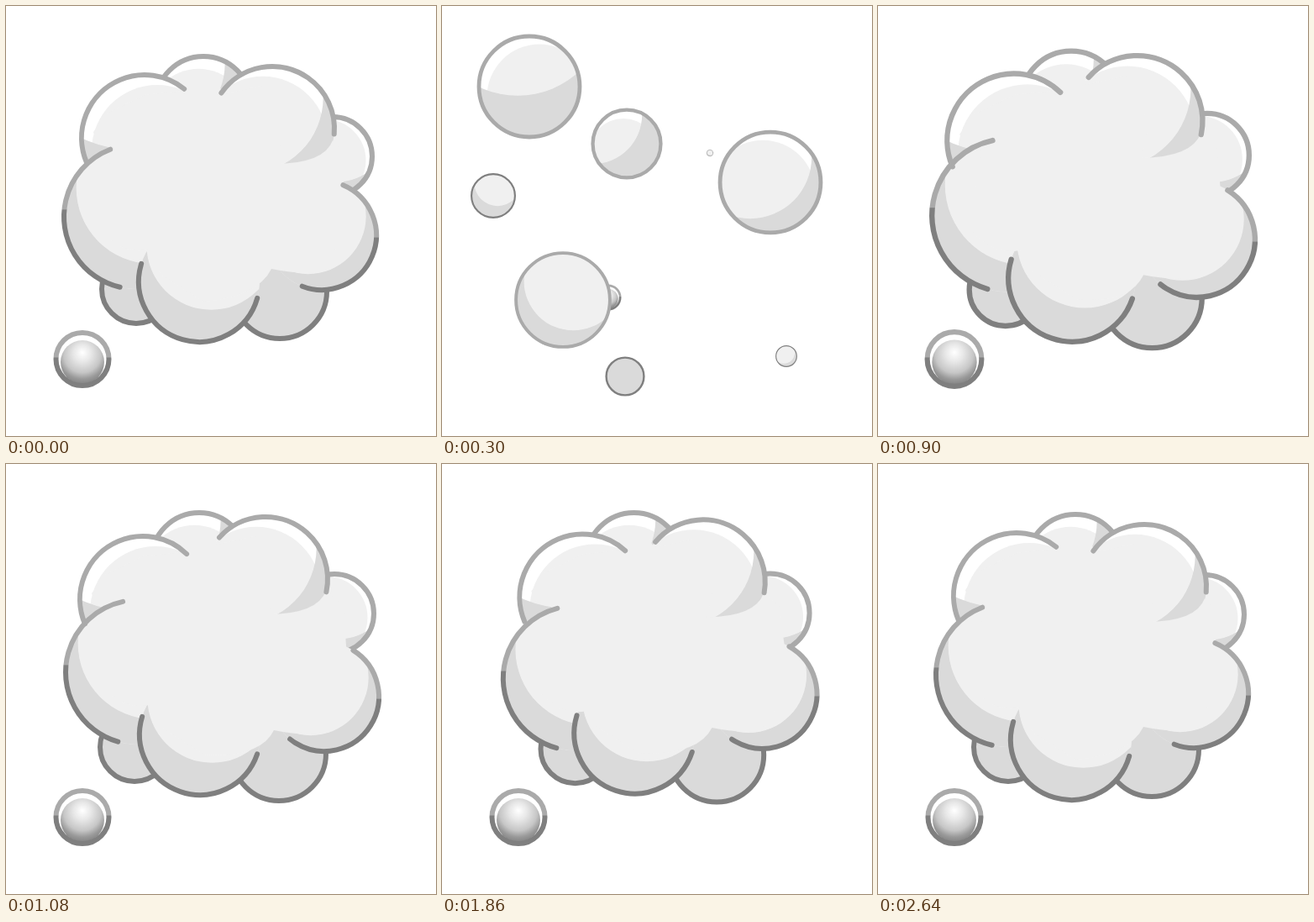
Write an HTML page with a canvas that moves like this. It is 512 px wide and 512 px high and loops after 2700 ms.

```html
<!DOCTYPE html>
<html lang="en">
<head>
<meta charset="utf-8">
<title>Thought bubble</title>
<style>
html, body { margin: 0; width: 100%; height: 100%; overflow: hidden; background: #fff; }
canvas { display: block; width: 512px; height: 512px; }
</style>
</head>
<body>
<canvas id="stage" width="512" height="512"></canvas>
<script>
const ctx = document.getElementById('stage').getContext('2d');
const LOOP = 2700, STEP = 60, BURST = 50, MERGE = 870;
const LIGHT = '#aaaaaa', DARK = '#7f7f7f', FILL = '#f0f0f0', SHADE = '#dadada';
const TAU = Math.PI * 2, rad = d => d * Math.PI / 180;

// Lobes from back to front.
// lit: lit circle in radii; gloss: centre of the area inside the white rim;
// sway: offsets at the wobble keys; arc: start, end and their swing in degrees;
// out: burst x, y, scale, end; grow: offset, start.
const lobes = {
  H: { x: 155, y: 337, r: 41, tone: DARK, sway: [[-2, 0], [2, 2], [4, 2]],
       out: [120, 400, .05, 310], grow: [-56, 40, 655] },
  I: { x: 326, y: 340, r: 56, tone: DARK, sway: [[-1, 5], [0, 7], [2, 5]],
       out: [218, 441, .4, 430], grow: [20, 40, 700] },
  B: { x: 235, y: 117, r: 57, tone: LIGHT, lit: [-1, -.85, 1.45], gloss: [-.1, .3],
       sway: [[-5, -2], [-9, -3], [-3, -1]], out: [220, 164, .71, 560], grow: [0, -15, 720] },
  D: { x: 389, y: 179, r: 47, tone: LIGHT, lit: [.1, -.7, 1.35], gloss: [-.2, .1],
       sway: [[2, -1], [2, -2], [1, -1]], out: [319, 175, .08, 330], grow: [15, -5, 700] },
  A: { x: 165, y: 157, r: 75, tone: LIGHT, lit: [-.23, -1.6, 1.78], gloss: [.2, .2],
       arc: [157, 309, 0, 5], sway: [[-2, 4], [2, 4], [2, -1]],
       out: [104, 96, .8, 600], grow: [-25, -20, 680] },
  C: { x: 317, y: 146, r: 74, tone: LIGHT, lit: [-.4, -.5, 1.22], gloss: [-.15, .2],
       arc: [215, 365, 7, 7], sway: [[-8, -9], [-9, -8], [-3, -3]],
       out: [391, 210, .81, 800], grow: [-16, -5, 656] },
  G: { x: 155, y: 251, r: 86, tone: LIGHT, split: -.1, lit: [.22, -.4, 1.05],
       arc: [103, 249, 3, 9], sway: [[2, -3], [5, 3], [2, 4]],
       out: [144, 350, .65, 560], grow: [-35, 30, 680] },
  E: { x: 376, y: 273, r: 65, tone: DARK, split: .04, lit: [-.25, -.35, 1.06],
       arc: [-67, 111, 9, 18], sway: [[3, 4], [7, -1], [3, 3]],
       out: [410, 417, .19, 370], grow: [15, 15, 690] },
  F: { x: 230, y: 328, r: 72, tone: DARK, lit: [.2, -.6, 1.07],
       arc: [16, 197, 3, 0], sway: [[1, -6], [1, -9], [-2, -5]],
       out: [61, 226, .36, 420], grow: [6, 80, 658] }
};
const ball = { x: 91, y: 420.5, r: 31.5, out: [198, 347, .45, 450] };
const order = Object.values(lobes);

// Bright middle of the cloud; each point follows a lobe (line or quadratic).
const middle = [
  ['A', 104, 150], ['A', 108, 166, 128, 168], ['G', 120, 200], ['G', 115, 270],
  ['G', 140, 296, 168, 290], ['F', 185, 320], ['F', 235, 352], ['E', 300, 346, 316, 313],
  ['E', 345, 319, 375, 317], ['E', 405, 270], ['E', 402, 213],
  ['D', 400, 170], ['C', 389, 160], ['C', 379, 187, 322, 188], ['C', 330, 150],
  ['C', 305, 95], ['C', 259, 105], ['B', 248, 84], ['B', 212, 84], ['A', 212, 101],
  ['A', 165, 106], ['A', 120, 128]
];

const keys = [1080, 1560, 2160, 2640];

// Smooth curve through the wobble keys; the last one is rest.
function sway(v, t) {
  const p = [...v, 0];
  t = Math.min(Math.max(t, keys[0]), keys[3]);
  let i = 0;
  while (i < 2 && t > keys[i + 1]) i++;
  const u = (t - keys[i]) / (keys[i + 1] - keys[i]);
  const a = p[Math.max(i - 1, 0)], b = p[i], c = p[i + 1], d = p[Math.min(i + 2, 3)];
  return b + u * ((c - a) / 2 + u * (a - 2.5 * b + 2 * c - d / 2 + u * (1.5 * (b - c) + (d - a) / 2)));
}

const clamp = u => Math.min(Math.max(u, 0), 1);
const backOut = u => 1 + 2.3 * (u - 1) ** 3 + 1.3 * (u - 1) ** 2;

// Fly out with drag and a little gravity while shrinking.
function burst(o, t) {
  const [x, y, k, end] = o.out;
  const age = t - BURST, ref = 300 - BURST, life = end - BURST;
  if (age < 0 || age >= life) return null;
  const n = age / ref, go = n ** .46, fall = 6.3 * n * (n - 1);
  const s = 1 - (age / life) ** (Math.log(1 - k) / Math.log(ref / life));
  return { x: o.x + (x - o.x) * go, y: o.y + (y - o.y) * go + fall, s };
}

function rest(o, t) {
  return { x: o.x + sway(o.sway.map(p => p[0]), t), y: o.y + sway(o.sway.map(p => p[1]), t), s: 1 };
}

function grow(o, t) {
  const p = rest(o, t), [dx, dy, start] = o.grow;
  const u = clamp((t - start) / 340), away = (1 - u) ** 3;
  return { x: p.x + dx * away, y: p.y + dy * away, s: u > 0 ? backOut(u) : 0 };
}

function disc(x, y, r, fill) {
  ctx.beginPath();
  ctx.arc(x, y, r, 0, TAU);
  ctx.fillStyle = fill;
  ctx.fill();
}

function body(o, p) {
  const r = o.r * p.s;
  if (!o.lit) return disc(p.x, p.y, r, SHADE);
  const [lx, ly, lr] = o.lit;
  ctx.save();
  disc(p.x, p.y, r, o.gloss ? '#fff' : FILL);
  ctx.clip();
  if (o.gloss) disc(p.x + o.gloss[0] * r, p.y + o.gloss[1] * r, 1.04 * r, FILL);
  ctx.beginPath();
  ctx.rect(p.x - 5 * r, p.y - 5 * r, 10 * r, 10 * r);
  ctx.arc(p.x + lx * r, p.y + ly * r, lr * r, 0, TAU);
  ctx.fillStyle = SHADE;
  ctx.fill('evenodd');
  ctx.restore();
}

function twoTone(y) {
  const g = ctx.createLinearGradient(0, y - .5, 0, y + .5);
  g.addColorStop(0, LIGHT);
  g.addColorStop(1, DARK);
  return g;
}

function ring(p, r, width, style, from = 0, to = TAU) {
  ctx.beginPath();
  ctx.arc(p.x, p.y, r, from, to);
  ctx.lineWidth = width;
  ctx.lineCap = 'round';
  ctx.strokeStyle = style;
  ctx.stroke();
}

function bubble(o, p) {
  if (!p || p.s <= .005) return;
  body(o, p);
  ring(p, o.r * p.s, Math.max(6 * p.s, .8), o.tone);
}

function drawMiddle(at) {
  ctx.beginPath();
  for (const [id, ...c] of middle) {
    const o = lobes[id], p = at(o), q = [];
    for (let i = 0; i < c.length; i += 2) {
      q.push(p.x + (c[i] - o.x) * p.s, p.y + (c[i + 1] - o.y) * p.s);
    }
    if (q.length > 2) ctx.quadraticCurveTo(...q);
    else ctx.lineTo(...q);
  }
  ctx.closePath();
  ctx.fillStyle = FILL;
  ctx.fill();
}

function cloud(at, t) {
  const w = sway([1, 1, .4], t);
  for (const o of order) {
    if (o.arc) body(o, at(o));
    else bubble(o, at(o));
  }
  drawMiddle(at);
  for (const o of order) {
    if (!o.arc) continue;
    const p = at(o), [a, b, da, db] = o.arc;
    const style = o.split === undefined ? o.tone : twoTone(p.y + o.split * o.r * p.s);
    ring(p, o.r * p.s, 6 * p.s, style, rad(a + da * w), rad(b + db * w));
  }
}

function drawBall(p) {
  if (!p || p.s <= .01) return;
  const { x, y, s } = p, r = ball.r * s;
  disc(x, y, r, '#fff');
  const g = ctx.createRadialGradient(x, y - 8 * s, 0, x, y - 5 * s, 34 * s);
  g.addColorStop(0, '#ffffff');
  g.addColorStop(.3, '#e8e8e8');
  g.addColorStop(.65, '#c6c6c6');
  g.addColorStop(.85, '#9a9a9a');
  g.addColorStop(1, '#868686');
  disc(x, y + 3.5 * s, 26 * s, g);
  ring(p, r, 6 * s, twoTone(y - 2 * s));
}

function draw(t) {
  ctx.fillStyle = '#fff';
  ctx.fillRect(0, 0, 512, 512);
  if (t < BURST) {
    cloud(o => rest(o, LOOP), LOOP);
    drawBall({ ...ball, s: 1 });
    return;
  }
  drawBall(burst(ball, t));
  if (t >= MERGE) cloud(o => grow(o, t), t);
  else if (t > 600) order.forEach(o => bubble(o, grow(o, t)));
  order.forEach(o => bubble(o, burst(o, t)));
  if (t > 600) {
    const u = clamp((t - 652) / 300);
    drawBall({ ...ball, s: u > 0 ? backOut(u) : 0 });
  }
}

const t0 = performance.now();
function tick() {
  const t = (performance.now() - t0) % LOOP;
  draw(Math.floor(t / STEP) * STEP);
  requestAnimationFrame(tick);
}
tick();
</script>
</body>
</html>
```
